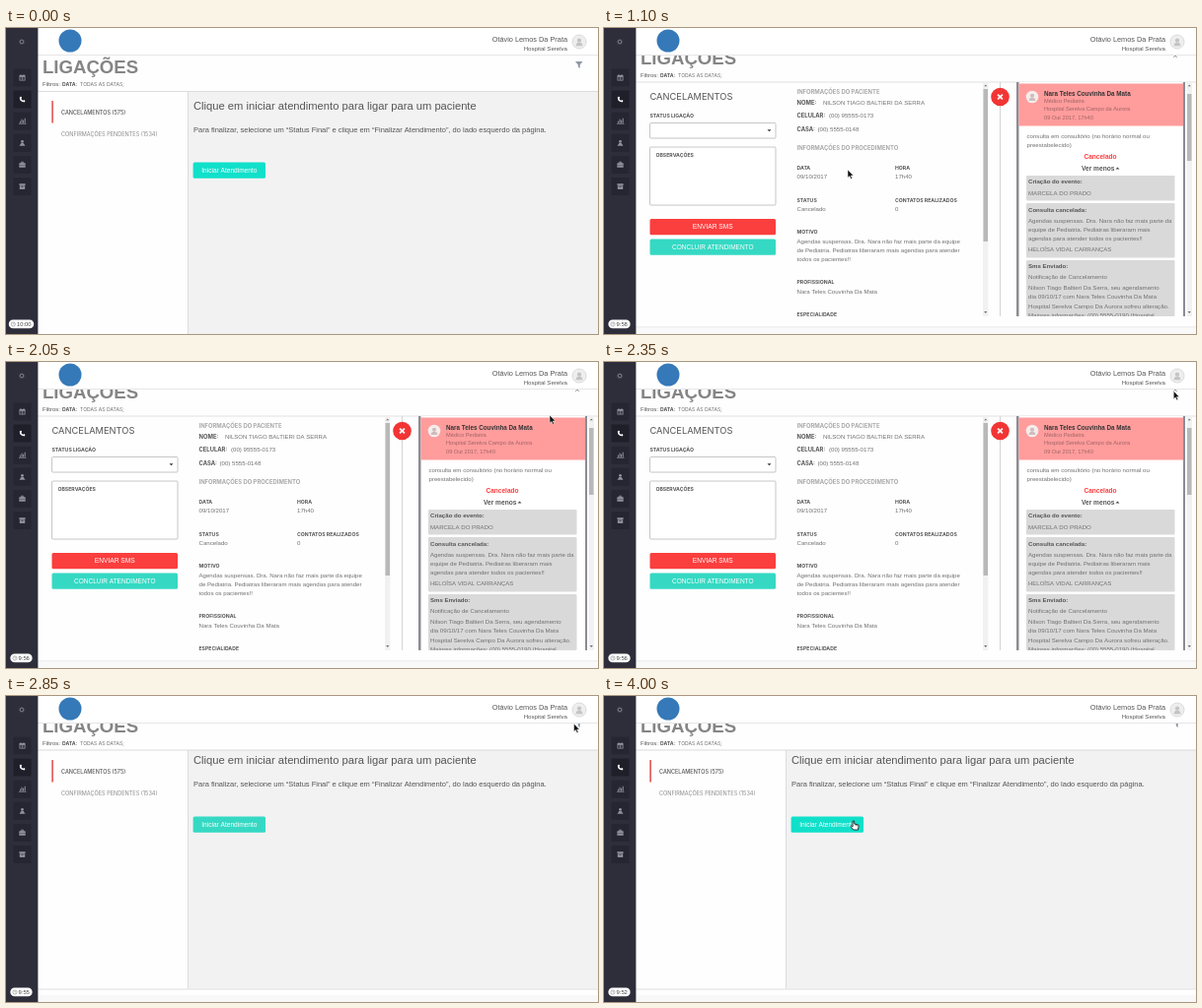
Write an HTML page with a canvas that moves like this. It is 600x311 px and loops after 4050 ms.

```html
<!DOCTYPE html>
<html lang="pt-BR">
<head>
<meta charset="utf-8">
<title>Ligações</title>
<style>
html, body { margin: 0; width: 100%; height: 100%; overflow: hidden; background: #fff; }
canvas { display: block; width: 600px; height: 311px; }
</style>
</head>
<body>
<canvas id="stage"></canvas>
<script>
const W = 600, H = 311, LOOP = 4050, STEP = 50;
const PAGE_SCROLL = -9, PANEL_SCROLL = -14, VEIL = 0.58;
const canvas = document.getElementById('stage');
const ctx = canvas.getContext('2d');
const dpr = window.devicePixelRatio || 1;
canvas.width = W * dpr;
canvas.height = H * dpr;

const DARK = '#555', MID = '#707070', SOFT = '#a8a8a8';
const RED = '#fb3e3e', TEAL = '#35d9c3', TEAL_HOVER = '#10e0ca';

const sans = (size, weight = 400) => `${weight} ${size}px "Liberation Sans", Arial, sans-serif`;
const caps = (size, weight = 400) => `${weight} ${size}px Inter, sans-serif`;
const LABEL = caps(5.15, 700), BODY = sans(6.12), BOLD = sans(6.1, 700);

function text(str, x, y, font, color = MID, align = 'left') {
  ctx.font = font;
  ctx.fillStyle = color;
  ctx.textAlign = align;
  ctx.fillText(str, x, y);
}

function lines(list, x, y, gap, font = BODY, color = MID) {
  list.forEach((str, i) => text(str, x, y + i * gap, font, color));
}

function rect(x, y, w, h, color) {
  ctx.fillStyle = color;
  ctx.fillRect(x, y, w, h);
}

function round(x, y, w, h, r, fill, stroke) {
  ctx.beginPath();
  ctx.roundRect(x, y, w, h, r);
  if (fill) { ctx.fillStyle = fill; ctx.fill(); }
  if (stroke) { ctx.strokeStyle = stroke; ctx.lineWidth = 1; ctx.stroke(); }
}

function circle(x, y, r, fill, stroke, width = 1) {
  ctx.beginPath();
  ctx.arc(x, y, r, 0, Math.PI * 2);
  if (fill) { ctx.fillStyle = fill; ctx.fill(); }
  if (stroke) { ctx.strokeStyle = stroke; ctx.lineWidth = width; ctx.stroke(); }
}

function poly(points, fill, stroke, width = 1) {
  ctx.beginPath();
  for (let i = 0; i < points.length; i += 2) ctx.lineTo(points[i], points[i + 1]);
  ctx.closePath();
  if (fill) { ctx.fillStyle = fill; ctx.fill(); }
  if (stroke) { ctx.strokeStyle = stroke; ctx.lineWidth = width; ctx.stroke(); }
}

function line(x1, y1, x2, y2, color, width = 1) {
  ctx.beginPath();
  ctx.moveTo(x1, y1);
  ctx.lineTo(x2, y2);
  ctx.strokeStyle = color;
  ctx.lineWidth = width;
  ctx.stroke();
}

function cross(x, y, r, color, width) {
  line(x - r, y - r, x + r, y + r, color, width);
  line(x - r, y + r, x + r, y - r, color, width);
}

function triangle(x, y, r, dir, color) {
  poly([x - r, y - dir * r / 2, x + r, y - dir * r / 2, x, y + dir * r / 2], color);
}

function shifted(dy, draw) {
  ctx.save();
  ctx.translate(0, dy);
  draw();
  ctx.restore();
}

function clipped(x, y, w, h, draw) {
  ctx.save();
  ctx.beginPath();
  ctx.rect(x, y, w, h);
  ctx.clip();
  draw();
  ctx.restore();
}

function person(x, y, r, back, front) {
  circle(x, y, r, back);
  circle(x, y - r * 0.2, r * 0.33, front);
  ctx.beginPath();
  ctx.arc(x, y + r * 0.65, r * 0.52, Math.PI, 0);
  ctx.fill();
}

function button(str, x, y, w, color, size) {
  round(x, y, w, 16.2, 1.5, color);
  text(str, x + w / 2, y + 10.3, sans(size), '#fff', 'center');
}

const sideIcons = [
  (x, y, c) => {
    rect(x - 3, y - 2.5, 6, 5.5, c);
    rect(x - 2.3, y - 0.7, 4.6, 3, '#3c3c4a');
    rect(x - 2, y - 3.3, 1, 1.5, c);
    rect(x + 1, y - 3.3, 1, 1.5, c);
    line(x, y - 0.7, x, y + 2.4, c, 0.6);
  },
  (x, y) => {
    ctx.beginPath();
    ctx.moveTo(x - 2, y - 2.2);
    ctx.quadraticCurveTo(x - 2, y + 1.7, x + 2.2, y + 2);
    ctx.strokeStyle = '#fff';
    ctx.lineWidth = 1.5;
    ctx.stroke();
    circle(x - 1.5, y - 1.9, 1, '#fff');
    circle(x + 1.8, y + 1.6, 1, '#fff');
  },
  (x, y, c) => {
    [2, 4, 3, 5].forEach((h, i) => rect(x - 2.6 + i * 1.6, y + 2 - h, 1, h, c));
    line(x - 3.6, y + 2.7, x + 4, y + 2.7, c, 0.7);
  },
  (x, y, c) => {
    circle(x, y - 1.5, 1.4, c);
    poly([x - 1, y, x + 1, y, x + 3, y + 3, x - 3, y + 3], c);
  },
  (x, y, c) => {
    round(x - 3.2, y - 1.7, 6.4, 4.6, 0.6, c);
    round(x - 1.2, y - 2.7, 2.4, 1.5, 0.3, null, c);
    line(x - 3.2, y + 0.7, x + 3.2, y + 0.7, '#3c3c4a', 0.5);
  },
  (x, y, c) => {
    rect(x - 3.1, y - 2.8, 6.2, 1.7, c);
    rect(x - 2.7, y - 0.7, 5.4, 3.6, c);
    rect(x - 1, y, 2, 0.7, '#3c3c4a');
  }
];

function timer(t) {
  const s = 600 - Math.floor(t / 500);
  const label = `${Math.floor(s / 60)}:${String(s % 60).padStart(2, '0')}`;
  ctx.font = sans(5.8);
  const w = ctx.measureText(label).width + 11, x = 15.5 - w / 2;
  round(x, 296.6, w, 8.6, 4.3, '#fff');
  circle(x + 4.6, 301, 2.1, null, '#888', 0.6);
  line(x + 4.6, 301, x + 4.6, 299.6, '#888', 0.5);
  line(x + 4.6, 301, x + 5.6, 301, '#888', 0.5);
  text(label, x + 8.2, 303.1, sans(5.8), '#444');
}

function sidebar(t) {
  rect(0, 0, 32.4, H, '#2e2e3b');
  circle(16, 14, 1.8, null, '#85858f', 0.9);
  for (let i = 0; i < 8; i++) {
    const a = i * Math.PI / 4;
    circle(16 + 2.7 * Math.cos(a), 14 + 2.7 * Math.sin(a), 0.4, '#85858f');
  }
  sideIcons.forEach((icon, i) => {
    const y = 50.5 + i * 22.1;
    round(7.5, y - 9, 18, 18, 1, i === 1 ? '#1f1f2a' : '#262632');
    icon(16.5, y, '#92929c');
  });
  timer(t);
}

function header() {
  rect(32, 0, 568, 27, '#fff');
  rect(32, 27, 568, 1, '#e6e6e6');
  circle(65, 13, 11.5, '#3579b8');
  text('Otávio Lemos Da Prata', 569, 14.2, sans(7.35), DARK, 'right');
  text('Hospital Serelva', 569, 23, sans(6.1), DARK, 'right');
  person(581, 14, 6.5, '#eee', '#c4c4c4');
  circle(581, 14, 7, null, '#c8c8c8', 0.7);
}

function titleBar(detail) {
  text('LIGAÇÕES', 37, 46, sans(18.6, 700), '#858585');
  text('Filtros:', 37, 59.4, sans(6), DARK);
  text('DATA:', 57, 59.4, caps(5.1, 700), DARK);
  text('TODAS AS DATAS;', 75, 59.4, caps(5.1), MID);
  if (detail) cross(579, 37, 1.9, '#8b919c', 0.9);
  else poly([577, 34, 584.5, 34, 581.7, 37.4, 581.7, 41, 579.8, 39.5, 579.8, 37.4], '#8f98a6');
}

function home(scrolled, hover) {
  const top = scrolled ? 55 : 64.5, bottom = scrolled ? 297.5 : H;
  rect(184, top, 416, bottom - top, '#f2f2f3');
  rect(184, top, 1, bottom - top, '#dcdcde');
  rect(32, top - 0.5, 568, 1, '#dcdcde');
  if (scrolled) {
    rect(32, bottom, 568, 1, '#dfdfe1');
    rect(32, 304, 568, 7, '#f8f8f8');
  }
  shifted(scrolled ? PAGE_SCROLL : 0, () => {
    rect(46.3, 74, 1.6, 22.5, '#e25555');
    text('CANCELAMENTOS (575)', 56, 87.6, caps(5.5, 500), DARK);
    text('CONFIRMAÇÕES PENDENTES (1534)', 56, 110, caps(5.55), '#8a8a8a');
  });
  shifted(scrolled ? PANEL_SCROLL : 0, () => {
    text('Clique em iniciar atendimento para ligar para um paciente', 190, 83.4, sans(11.2), DARK);
    text('Para finalizar, selecione um “Status Final” e clique em “Finalizar Atendimento”, do lado esquerdo da página.',
      190, 106.4, sans(7.5), DARK);
    button('Iniciar Atendimento', 189.6, 136.5, 73.4, hover ? TEAL_HOVER : TEAL, 6.55);
  });
}

function form(closing) {
  text('CANCELAMENTOS', 46.5, 82.4, caps(9.3), DARK);
  text('STATUS LIGAÇÃO', 46.5, 100, LABEL, DARK);
  round(46.5, 105.5, 127.5, 15.5, 1, '#fff', '#c6c6c6');
  triangle(167.5, 113.3, 2, 1, '#333');
  round(46.5, 130, 127.5, 59, 1, '#fff', '#c6c6c6');
  text('OBSERVAÇÕES', 52.5, 140, LABEL, DARK);
  button('ENVIAR SMS', 46.5, 203, 127.5, RED, 6.65);
  button('CONCLUIR ATENDIMENTO', 46.5, 223.6, 127.5, closing ? TEAL_HOVER : TEAL, 6.5);
}

const DOCTOR = 'Nara Teles Couvinha Da Mata';
const REASON = [
  'Agendas suspensas. Dra. Nara não faz mais parte da equipe',
  'de Pediatria. Pediatras liberaram mais agendas para atender',
  'todos os pacientes!!'
];

function field(label, value, x, y) {
  text(label, x, y, LABEL, DARK);
  text(value, x, y + 9.4, BODY);
}

function patient(date, hour) {
  const x = 195.5, strong = caps(5.85, 700);
  text('INFORMAÇÕES DO PACIENTE', x, 81.2, strong, SOFT);
  text('NOME:', x, 91.7, strong, DARK);
  text('NILSON TIAGO BALTIERI DA SERRA', 222, 91.7, sans(6));
  text('CELULAR:', x, 105.3, strong, DARK);
  text('(00) 95555-0173', 228, 105.3, BODY);
  text('CASA:', x, 119.1, strong, DARK);
  text('(00) 5555-0148', 216.5, 119.1, BODY);
  text('INFORMAÇÕES DO PROCEDIMENTO', x, 138, strong, SOFT);
  field('DATA', date, x, 158);
  field('HORA', hour, 295, 158);
  field('STATUS', 'Cancelado', x, 190.7);
  field('CONTATOS REALIZADOS', '0', 295, 190.7);
  text('MOTIVO', x, 223.4, LABEL, DARK);
  lines(REASON, x, 232.6, 9.3);
  field('PROFISSIONAL', DOCTOR, x, 274.4);
  text('ESPECIALIDADE', x, 307.4, LABEL, DARK);
}

function scrollbar(x, top, bottom, thumbTop, thumbBottom) {
  rect(x, top, 5.5, bottom - top, '#f1f1f1');
  rect(x + 0.5, thumbTop, 4.5, thumbBottom - thumbTop, '#b8b8b8');
  triangle(x + 2.75, top + 3.5, 1.6, -1, '#666');
  triangle(x + 2.75, bottom - 4, 1.6, 1, '#444');
}

function history() {
  rect(401, 55, 1, 238, '#d4d4d4');
  circle(401.5, 70, 9.3, '#f23434');
  cross(401.5, 70, 2.4, '#fff', 1.8);

  rect(418, 55, 171, 238, '#8b8b93');
  rect(420.5, 55, 166.5, 238, '#fff');
  rect(420.5, 56.5, 166.5, 43, '#ff9c9c');
  person(434, 70, 6.3, '#f5eded', '#cfbcbc');
  text(DOCTOR, 446, 68.6, sans(6.3, 700), '#333');
  lines(['Médico Pediatra', 'Hospital Serelva Campo da Aurora', '09 Out 2017, 17h40'], 446, 76.2, 8.2, sans(5.65), '#a06464');

  lines(['consulta em consultório (no horário normal ou', 'preestabelecido)'], 428.5, 111.8, 9.4);
  text('Cancelado', 503, 133, sans(6.55, 700), RED, 'center');
  text('Ver menos', 484, 145, sans(6.6, 700), DARK);
  triangle(520.5, 142.5, 2, -1, '#444');

  [[150, 25.5], [178, 55.5], [236, 57]].forEach(([y, h]) => round(428, y, 150.5, h, 1, '#d9d9da'));
  const x = 430;
  text('Criação do evento:', x, 158.4, BOLD, DARK);
  text('MARCELA DO PRADO', x, 169.6, BODY);
  text('Consulta cancelada:', x, 186.7, BOLD, DARK);
  lines([
    'Agendas suspensas. Dra. Nara não faz mais parte da',
    'equipe de Pediatria. Pediatras liberaram mais',
    'agendas para atender todos os pacientes!!'
  ], x, 197.6, 9.3);
  text('HELOÍSA VIDAL CARRANÇAS', x, 227.4, sans(6));
  text('Sms Enviado:', x, 244.4, BOLD, DARK);
  text('Notificação de Cancelamento', x, 255.2, BODY);
  lines([
    'Nilson Tiago Baltieri Da Serra, seu agendamento',
    'dia 09/10/17 com ' + DOCTOR,
    'Hospital Serelva Campo Da Aurora sofreu alteração.',
    'Maiores informações: (00) 5555-0190 (Hospital'
  ], x, 266.2, 9.2);
  scrollbar(590.5, 55, 293, 67, 135);
}

function detail(scrolled, withHistory, closing) {
  const top = scrolled ? 55 : 64.5, bottom = scrolled ? 293 : H;
  rect(32, top - 0.5, 568, 1, '#e2e2e4');
  shifted(scrolled ? PAGE_SCROLL : 0, () => form(closing));
  clipped(184, top, 416, bottom - top, () => {
    shifted(scrolled ? PANEL_SCROLL : 0, () => scrolled ? patient('09/10/2017', '17h40') : patient('29/09/2017', '02h08.'));
    if (scrolled) scrollbar(384, 55, 293, 62, 217);
    else scrollbar(384, 69, 308, 76, 232);
    if (withHistory) history();
  });
  if (scrolled) {
    rect(32, 303.5, 568, 1, '#e4e4e6');
    rect(32, 304.5, 568, 7, '#f9f9f9');
  }
}

function loader(alpha, t) {
  rect(32, 28, 568, H - 28, `rgba(255,255,255,${alpha})`);
  ctx.globalAlpha = Math.min(1, alpha * 1.5);
  circle(317, 161, 9, null, '#dcdcdc', 1);
  const a = t / 110 + 1.6;
  ctx.beginPath();
  ctx.arc(317, 161, 9, a, a + Math.PI / 3);
  ctx.strokeStyle = '#777';
  ctx.lineWidth = 1;
  ctx.stroke();
  ctx.globalAlpha = 1;
}

function arrow(x, y) {
  ctx.save();
  ctx.translate(x, y);
  poly([0, 0, 0, 8.2, 1.9, 6.5, 3.2, 9.4, 4.6, 8.8, 3.3, 6, 5.8, 6], '#111', '#fff', 0.5);
  ctx.restore();
}

function hand(x, y) {
  ctx.save();
  ctx.translate(x, y);
  poly([-0.9, 0, 0.6, 0, 0.8, 3.1, 4.6, 3.8, 5.2, 5, 4.4, 9, -0.4, 9, -3, 5.6, -2.4, 4.7, -0.9, 5.8], '#fff', '#222', 0.9);
  line(2.2, 3.6, 2.2, 5.2, '#222', 0.5);
  line(3.7, 3.9, 3.7, 5.4, '#222', 0.5);
  ctx.restore();
}

const clamp = v => Math.max(0, Math.min(1, v));
const ramp = (t, from, to) => clamp((t - from) / (to - from));

const path = [[1600, 247, 144], [2050, 551, 54], [2250, 578, 30], [2600, 575.5, 28]];

function pointer(t) {
  if (t >= 3000) {
    const e = 1 - (1 - ramp(t, 3000, 3850)) ** 2;
    const bend = (a, b, c) => (1 - e) ** 2 * a + 2 * e * (1 - e) * b + e * e * c;
    return [bend(575.5, 397, 253), bend(28, 119, 127)];
  }
  let pos = path[0].slice(1);
  for (let i = 1; i < path.length; i++) {
    const [t0, x0, y0] = path[i - 1], [t1, x1, y1] = path[i];
    if (t >= t0) {
      const u = ramp(t, t0, t1);
      pos = [x0 + (x1 - x0) * u, y0 + (y1 - y0) * u];
    }
  }
  return pos;
}

function veil(t) {
  if (t < 750) return VEIL * ramp(t, 450, 600);
  if (t < 2750) return VEIL * ramp(t, 2400, 2600);
  return VEIL * (1 - ramp(t, 2700, 2850));
}

function draw(t) {
  ctx.setTransform(dpr, 0, 0, dpr, 0, 0);
  rect(0, 0, W, H, '#fefefe');
  const showDetail = t >= 750 && t < 2750, scrolled = t >= 1000;
  const [x, y] = pointer(t);
  const onButton = t > 3000 && x >= 190 && x <= 263 && y >= 122 && y <= 138;
  const alpha = veil(t);

  shifted(scrolled ? PAGE_SCROLL : 0, () => titleBar(showDetail));
  if (showDetail) detail(scrolled, t >= 1100, alpha > 0);
  else home(scrolled, t < 750 || onButton);

  if (alpha > 0) loader(alpha, t < 750 ? Math.min(t, 600) : t);
  header();
  sidebar(t);

  if (t < 500) return;
  if (t < 1000) hand(248, 144);
  else if (onButton) hand(x, y);
  else arrow(x, y);
}

function tick() {
  const t = performance.now() % LOOP;
  draw(Math.floor(t / STEP) * STEP);
  requestAnimationFrame(tick);
}
tick();
</script>
</body>
</html>
```
